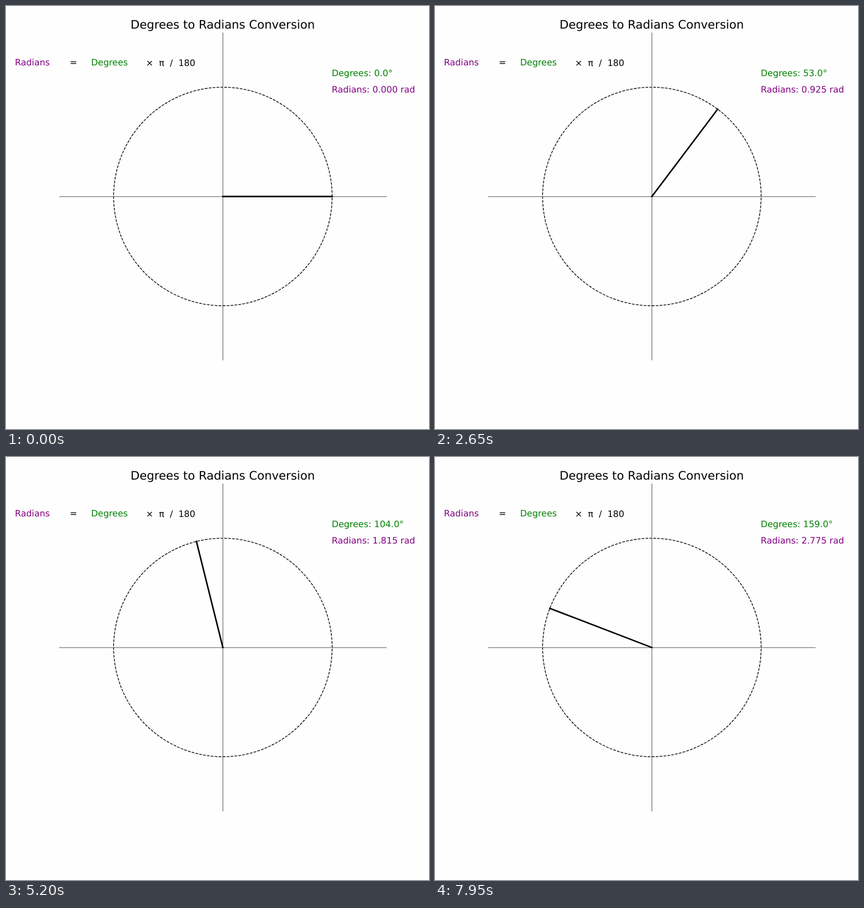
Recreate the animation shown at these times as an HTML page. Size 748x748 px, loop 8000 ms.

```html
<!DOCTYPE html>
<html lang="en">
<head>
<meta charset="utf-8">
<title>Degrees to Radians Conversion</title>
<style>
  html, body { margin: 0; width: 100%; height: 100%; overflow: hidden; background: #fefefe; }
  svg { display: block; width: 748px; height: 748px; }
  text { font: 15.58px "DejaVu Sans", sans-serif; white-space: pre; text-rendering: geometricPrecision; }
  .title { font-size: 20.78px; text-anchor: middle; }
  .degrees { fill: #008000; }
  .radians { fill: #800080; }
  path { fill: none; stroke: #000; }
  .axes { stroke: #4c4c4c; stroke-width: 0.95; }
  .circle { stroke-width: 1.3; stroke-dasharray: 4.81 2.08; }
  .radius { stroke-width: 2.6; stroke-linecap: square; }
</style>
</head>
<body>
<svg viewBox="0 0 748 748">
  <path class="circle" d="M383.5 530 a193.2 193.2 0 0 0 0 -386.4 a193.2 193.2 0 0 0 0 386.4"/>
  <path class="axes" d="M94 337.05 H673 M383.6 47 V626.5"/>
  <path class="radius" id="radius"/>
  <text class="title" x="383.2" y="39.7">Degrees to Radians Conversion</text>
  <text class="radians" x="15.7" y="105">Radians</text>
  <text x="112.7" y="105">=</text>
  <text class="degrees" x="150.6" y="105">Degrees</text>
  <text x="247.5" y="105.7">×  π  /  180</text>
  <text class="degrees" id="degrees" x="576" y="124.3"></text>
  <text class="radians" id="radians" x="576" y="153.3"></text>
</svg>
<script>
  const LOOP = 8000, STEP = 50;
  const CX = 383.5, CY = 336.9, R = 193.2;
  const byId = id => document.getElementById(id);
  const radius = byId("radius"), degreesLabel = byId("degrees"), radiansLabel = byId("radians");

  // The angle advances one whole degree per step.
  function draw(time) {
    const degrees = Math.floor((time % LOOP) / STEP);
    const radians = degrees * Math.PI / 180;
    const x = CX + R * Math.cos(radians), y = CY - R * Math.sin(radians);
    radius.setAttribute("d", `M${CX} ${CY} L${x} ${y}`);
    degreesLabel.textContent = `Degrees: ${degrees.toFixed(1)}°`;
    radiansLabel.textContent = `Radians: ${radians.toFixed(3)} rad`;
  }

  const start = performance.now();
  function tick() {
    draw(performance.now() - start);
    requestAnimationFrame(tick);
  }
  tick();
</script>
</body>
</html>
```
